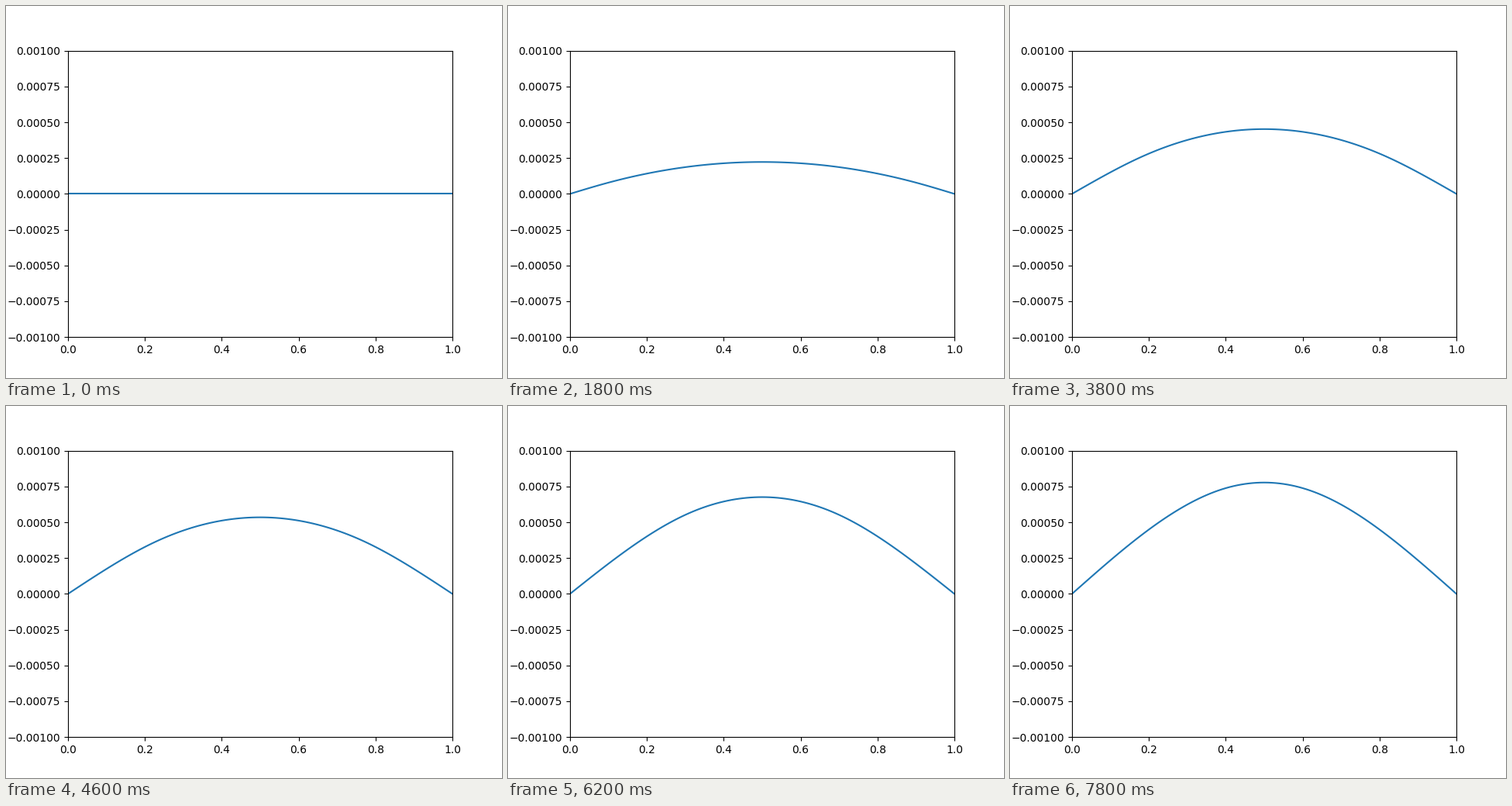
Write a matplotlib script that moves like this. It is 640x480 px and loops after 8000 ms.

```python
import numpy as np
import matplotlib.pyplot as plt
from matplotlib.animation import FuncAnimation

# Vibrating string: flat at the start, initial velocity x(1 - x), ends fixed.
SPEED = 100.0
DT = 1e-4
FRAMES = 40

x = np.linspace(0, 1, 101)


def velocity_integral(s):
    """Antiderivative of x(1 - x), extended as an even function of period 2."""
    s = np.abs((s + 1) % 2 - 1)
    return s**2 / 2 - s**3 / 3


def displacement(t):
    """d'Alembert solution of the wave equation."""
    shift = SPEED * t
    return (velocity_integral(x + shift) - velocity_integral(x - shift)) / (2 * SPEED)


fig, ax = plt.subplots(figsize=(6.4, 4.8), dpi=100)
ax.set_xlim(0, 1)
ax.set_ylim(-0.001, 0.001)
line, = ax.plot(x, displacement(0), color="#1f77b4", lw=1.5)


def update(i):
    line.set_ydata(displacement(i * DT))
    return line,


anim = FuncAnimation(fig, update, frames=FRAMES, interval=200,
                     repeat=True, repeat_delay=0)
plt.show()
```
